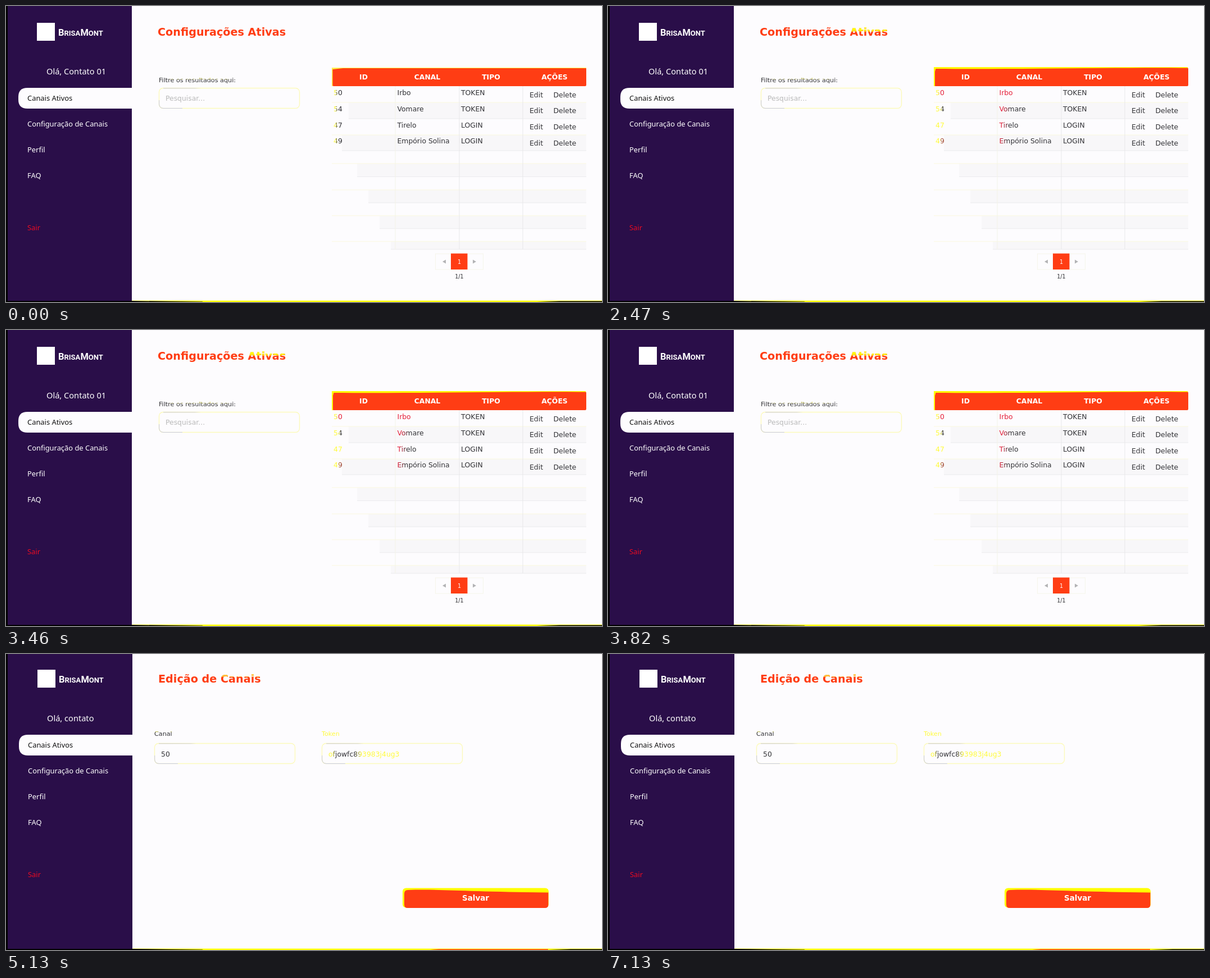
An HTML page that plays this animation: 1061 by 528 pixels, repeating every 8 s.

```html
<!DOCTYPE html>
<html lang="pt-BR">
<head>
<meta charset="utf-8">
<title>Configurações</title>
<style>
html, body { margin: 0; width: 100%; height: 100%; overflow: hidden; background: #fdfcfe; }
svg { display: block; width: 1061px; height: 528px; }
text { font: 12.4px "DejaVu Sans", sans-serif; white-space: pre; }
.side text { font: 12.9px "Noto Sans", "Open Sans", sans-serif; fill: #fff; }
.side .hello { font-size: 14.6px; }
.side .on { fill: #111; }
.side .exit { fill: #ea0b22; }
.side .brand { font: bold 13px Roboto, sans-serif; }
.brand .cap { font-size: 16.5px; }
.title { font-size: 19.2px; font-weight: bold; }
.label { font-size: 11.2px; }
.head { font-weight: bold; fill: #fff; text-anchor: middle; }
.mid { font-size: 9.6px; text-anchor: middle; }
.save { font-size: 13.5px; font-weight: bold; fill: #fff; text-anchor: middle; }
</style>
</head>
<body>
<svg id="stage" viewBox="0 0 1061 528"></svg>
<script>
const LOOP = 8000;
const INK = '#333337', ORANGE = '#ff3d14', YELLOW = '#ffff00', PURPLE = '#2a0e49', PAPER = '#fdfcfe';
const FADED = '#fffb3c', RED = '#e5213a';

let defs = '', gradCount = 0;

// Linear gradient in stage units; stops are [offset, colour]
function grad(x1, y1, x2, y2, ...stops) {
  const id = 'g' + gradCount++;
  defs += `<linearGradient id="${id}" gradientUnits="userSpaceOnUse" x1="${x1}" y1="${y1}" x2="${x2}" y2="${y2}">` +
    stops.map(([o, c]) => `<stop offset="${o}" stop-color="${c}"/>`).join('') + '</linearGradient>';
  return `url(#${id})`;
}
const across = (x, a, b, soft = 3) => grad(x - soft, 0, x + soft, 0, [0, a], [1, b]);

const rect = (x, y, w, h, fill, extra = '') =>
  `<rect x="${x}" y="${y}" width="${w}" height="${h}" fill="${fill}" ${extra}/>`;
const path = (d, fill, extra = '') => `<path d="${d}" fill="${fill}" ${extra}/>`;
const text = (x, y, s, fill = INK, cls = '') =>
  `<text x="${x}" y="${y}" fill="${fill}" class="${cls}">${s}</text>`;
const group = (id, body) => `<g id="${id}">${body}</g>`;

// Text whose upper part takes another colour between two x positions
function tipped(x, y, s, cls, base, tip, from, to, top, cut) {
  const id = 'c' + gradCount++;
  defs += `<clipPath id="${id}"><rect x="${from}" y="${top}" width="${to - from}" height="${cut - top}"/></clipPath>`;
  return text(x, y, s, base, cls) + `<g clip-path="url(#${id})">${text(x, y, s, tip, cls)}</g>`;
}

function sidebar(dx, dy, name) {
  const menu = ['Canais Ativos', 'Configuração de Canais', 'Perfil', 'FAQ'];
  return rect(0, 0, 3, 528, '#000') + rect(3, 0, 221 + dx, 526, PURPLE) +
    `<g class="side" transform="translate(${dx} ${dy})">` +
    rect(55, 30, 32, 32, '#fff') +
    '<text class="brand" x="93" y="53"><tspan class="cap">B</tspan>RISA<tspan class="cap">M</tspan>ONT</text>' +
    text(72, 122, 'Olá, ' + name, '#fff', 'hello') +
    path('M224 146H38Q22 146 22 162V167Q22 183 38 183H224Z', PAPER) +
    menu.map((s, i) => text(38, 169 + 46 * i, s, '#fff', i ? '' : 'on')).join('') +
    text(38, 400, 'Sair', RED, 'exit') + '</g>';
}

function field(x, y) {
  const glow = grad(x + 20, 0, x + 75, 0, [0, '#a9a7cf'], [0.8, '#b5b3d8'], [1, '#fdfbc4']);
  return rect(x + .5, y + .5, 250, 36, PAPER, 'rx="7" stroke="#fcfabb" stroke-width="1.4"') +
    path(`M${x + .7} ${y + 22}V${y + 29}Q${x + 1} ${y + 36} ${x + 8} ${y + 36.5}H${x + 42}`, 'none',
      'stroke="#c9cbe0" stroke-width="1"') +
    path(`M${x + 8} ${y + .8}H${x + 142}`, 'none', `stroke="${glow}" stroke-width="1" opacity=".6"`);
}

function floor(yellowFrom, blackFrom) {
  return rect(yellowFrom, 525.5, 1061 - yellowFrom, 2.5, YELLOW) +
    path(`M0 526H${yellowFrom}L350 527.5V528H0Z`, '#000') +
    path(`M${blackFrom} 528L${blackFrom + 40} 526.5H1061V528Z`, '#000');
}

const COLS = [580, 693, 807, 920, 1033];
const ROWS = [
  [50, 'Irbo', 'TOKEN'], [54, 'Vomare', 'TOKEN'],
  [47, 'Tirelo', 'LOGIN'], [49, 'Empório Solina', 'LOGIN']
];
const rowY = i => 159 + 28.8 * i;

function grid() {
  const stripes = [[172, 29, 610], [230, 28, 598], [281, 23.5, 625], [328, 23, 645], [374, 23, 665], [420, 14, 685]];
  const shade = '#f8f7f9';
  let s = '';
  for (const [y, h, x] of stripes) {
    s += rect(x, y, 1033 - x, h, shade) +
      rect(580, y - .5, 453, 1, '#fcfae0') + rect(x, y + h - .5, 1033 - x, 1, '#ebebee');
  }
  s += rect(692.5, 143, 1, 291, '#f3f3e8');
  for (const x of COLS.slice(2, 4)) s += rect(x - .5, 143, 1, 291, '#e8e8ea');
  return s;
}

function pager() {
  return rect(764.5, 442, 85, 28, PAPER, 'stroke="#f5f5ea"') + rect(792, 441.5, 29.5, 28.5, ORANGE) +
    path('M783 452.5V459.5L777 456ZM831 452.5V459.5L837 456Z', '#b3b3b5') +
    text(807, 459.5, '1', '#fff', 'mid') + text(807, 486, '1/1', INK, 'mid');
}

function listPage() {
  const heads = ['ID', 'CANAL', 'TIPO', 'AÇÕES'];
  const cut = [590, 594, 601, 592], after = [RED, INK, INK, '#a04a35'];
  const nameCut = [730, 710, 707, 704];
  const ids = fill => ROWS.map((r, i) => text(583, rowY(i), r[0], fill(i))).join('');
  const names = fill => ROWS.map((r, i) => text(696.5, rowY(i), r[1], fill(i))).join('');
  const title = 'Configurações Ativas';
  const early = across(588, FADED, INK, 2);
  const tip = grad(0, 37, 0, 48, [0, '#fffd50'], [.5, YELLOW], [1, '#ffa020']);

  return sidebar(0, 0, 'Contato 01') +
    group('titlePlain', text(270, 53, title, ORANGE, 'title')) +
    group('titleTipped', tipped(270, 53, title, 'title', ORANGE, tip, 430, 500, 34, 46)) +
    tipped(272, 136, 'Filtre os resultados aqui:', 'label', INK, '#fffb70', 291, 398, 122, 130.5) +
    field(272, 146) + text(284, 169, 'Pesquisar...', '#b9b9b9') +
    grid() +
    rect(581, 110, 452, 33, ORANGE, 'rx="2"') +
    group('rimThin', path('M580 143V110H1033V111H600L581.5 113V143Z', '#fff04a')) +
    group('rimThick', path('M580 143V109H1032V110.5C900 109.5 760 113 583.5 112L582 117V143Z', YELLOW)) +
    heads.map((h, i) => text((COLS[i] + COLS[i + 1]) / 2, 131, h, '#fff', 'head')).join('') +
    group('idsEarly', ids(() => early)) +
    group('idsLate', ids(i => across(cut[i], FADED, after[i], 2))) +
    group('namesEarly', names(() => INK)) +
    group('namesLate', names(i => across(nameCut[i], RED, INK, 7))) +
    ROWS.map((r, i) => text(810, rowY(i), r[2]) +
      text(932, rowY(i) + 3.6, 'Edit') + text(974.5, rowY(i) + 3.6, 'Delete')).join('') +
    pager() + floor(224, 945);
}

function editPage() {
  const token = 'ofjowfc893983j4ug3';
  const tokenFill = end => grad(574, 0, 702, 0,
    [0, FADED], [.06, FADED], [.09, INK], [(end - 580) / 128, INK], [(end - 568) / 128, FADED], [1, FADED]);
  const tip = grad(0, 35, 0, 46, [0, '#ffe24a'], [1, '#ff8a18']);
  return sidebar(1, -2, 'contato') +
    tipped(271, 51, 'Edição de Canais', 'title', ORANGE, tip, 383, 454, 32, 41) +
    tipped(264, 146, 'Canal', 'label', INK, '#d9d75a', 264, 296, 134, 139.5) +
    text(562, 146, 'Token', FADED, 'label') +
    field(264, 159) + field(562, 159) +
    text(276, 183, '50') +
    group('tokenShort', text(574, 183, token, tokenFill(616))) +
    group('tokenLong', text(574, 183, token, tokenFill(627))) +
    rect(706, 417.5, 260, 35, YELLOW, 'rx="6"') +
    path('M709 428Q709 421 715 421C770 419 820 424 965.5 425.5V447Q965.5 453 959.5 453H715Q709 453 709 447Z', ORANGE) +
    text(836, 440, 'Salvar', '#fff', 'save') +
    floor(225, 965) + path('M755 528L770 526.5H965V528Z', ORANGE);
}

const body = group('list', listPage()) + group('edit', editPage());
const stage = document.getElementById('stage');
stage.innerHTML = `<defs>${defs}</defs>` + rect(0, 0, 1061, 528, PAPER) + body;

// Part, visible from, visible until (ms)
const STEPS = [
  ['list', 0, 4060], ['edit', 4060, LOOP],
  ['titlePlain', 0, 470], ['titleTipped', 470, 4060],
  ['rimThin', 0, 470], ['rimThick', 470, 4060],
  ['idsEarly', 0, 470], ['idsLate', 470, 4060],
  ['namesEarly', 0, 810], ['namesLate', 810, 4060],
  ['tokenShort', 4060, 5130], ['tokenLong', 5130, LOOP]
].map(([id, from, to]) => ({ el: document.getElementById(id), from, to }));

function draw() {
  const t = performance.now() % LOOP;
  for (const s of STEPS) s.el.style.display = t >= s.from && t < s.to ? '' : 'none';
  requestAnimationFrame(draw);
}
draw();
</script>
</body>
</html>
```
